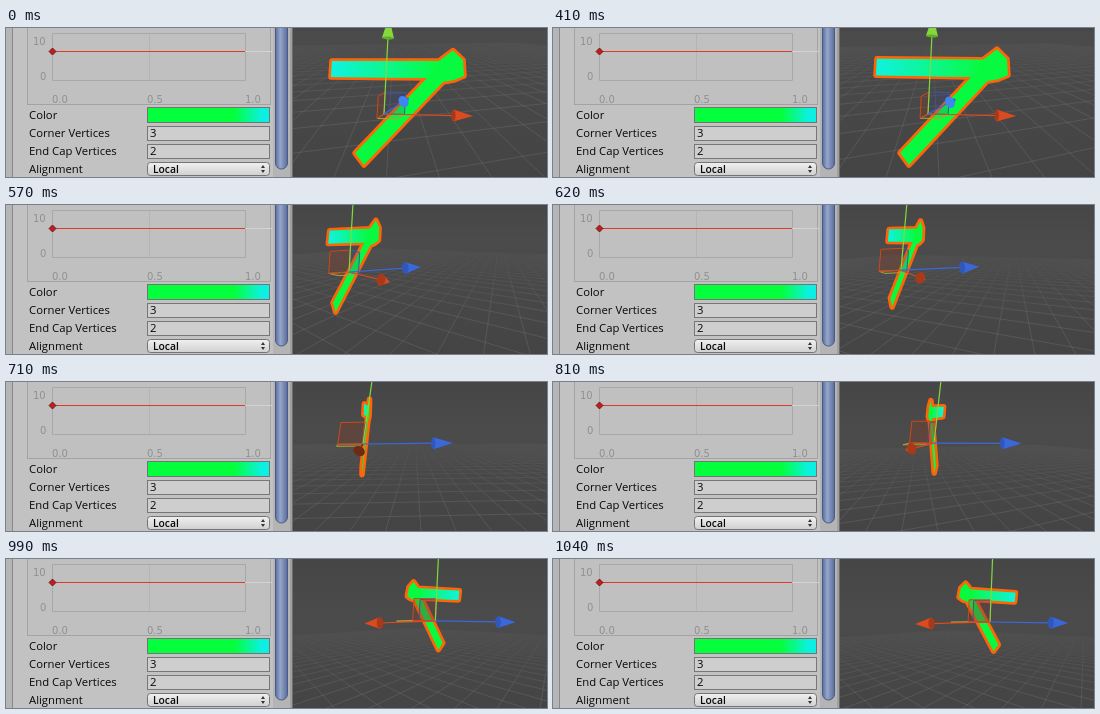
Write an HTML page with a canvas that moves like this. It is 541 px wide and 149 px high and loops after 1110 ms.

```html
<!DOCTYPE html>
<html lang="en">
<head>
<meta charset="utf-8">
<title>Line renderer orbit</title>
<style>
  html, body { margin: 0; width: 100%; height: 100%; overflow: hidden; background: #c2c2c2; }
  svg, canvas { position: absolute; top: 0; display: block; }
  svg { left: 0; }
  canvas { left: 287px; }
  text { font: 11.3px "Open Sans", "DejaVu Sans", sans-serif; fill: #080808; }
  .axis text { font: 10px "DejaVu Sans", sans-serif; fill: #909090; }
  .field rect { fill: #cecece; stroke: #777; }
</style>
</head>
<body>
<svg width="287" height="149" viewBox="0 0 287 149">
  <defs>
    <linearGradient id="ramp">
      <stop offset=".71" stop-color="#04ff3c"/>
      <stop offset=".94" stop-color="#0cf0e4"/>
    </linearGradient>
    <linearGradient id="thumb">
      <stop offset="0" stop-color="#5a6e9e"/>
      <stop offset=".4" stop-color="#94a6ca"/>
      <stop offset="1" stop-color="#5a6d9a"/>
    </linearGradient>
    <linearGradient id="popup" x2="0" y2="1">
      <stop offset="0" stop-color="#f0f0f0"/>
      <stop offset="1" stop-color="#d0d0d0"/>
    </linearGradient>
  </defs>
  <rect width="287" height="149" fill="#c2c2c2"/>
  <rect width="6" height="149" fill="#b5b5b5"/>
  <path d="M6.5 0V149" stroke="#898989"/>

  <g class="axis">
    <rect x="21.5" y="-4.5" width="243" height="81" fill="#c0c0c0" stroke="#a3a3a3"/>
    <path d="M143.5 5V52" stroke="#b4b4b4"/>
    <path d="M46.5 5.5H239.5V52.5H46.5Z" fill="none" stroke="#a8a8a8"/>
    <path d="M239 23.5H266" stroke="#d2d2d2"/>
    <path d="M46 23.5H239" stroke="#e03a2c"/>
    <path d="M46.5 20L50 23.5L46.5 27L43 23.5Z" fill="#c41c1c" stroke="#5c1414" stroke-width=".8"/>
    <text x="27" y="17">10</text>
    <text x="34" y="52">0</text>
    <text x="46" y="75">0.0</text>
    <text x="141" y="75">0.5</text>
    <text x="239" y="75">1.0</text>
  </g>

  <text x="23" y="91">Color</text>
  <text x="23" y="109">Corner Vertices</text>
  <text x="23" y="127">End Cap Vertices</text>
  <text x="23" y="145">Alignment</text>
  <rect x="141.5" y="79.5" width="122" height="15" fill="url(#ramp)" stroke="#747474"/>
  <g class="field">
    <rect x="141.5" y="98.5" width="122" height="14"/>
    <rect x="141.5" y="116.5" width="122" height="14"/>
    <text x="144" y="109">3</text>
    <text x="144" y="127">2</text>
  </g>
  <rect x="141.5" y="134.5" width="122" height="13" rx="3" fill="url(#popup)" stroke="#747474"/>
  <text x="147" y="145" style="font-size:10.3px;font-weight:600">Local</text>
  <path d="M255 140L257 137L259 140ZM255 142L257 145L259 142Z" fill="#333"/>

  <rect x="267" width="17" height="149" fill="#b4b4b4"/>
  <rect x="269.5" y="-10" width="12" height="151" rx="6" fill="url(#thumb)" stroke="#4a5a84"/>
  <rect x="284" width="3" height="149" fill="#a0a0a0"/>
  <path d="M286.5 0V149" stroke="#6c6c6c"/>
</svg>
<canvas id="scene" width="254" height="149"></canvas>

<script>
const ctx = document.getElementById('scene').getContext('2d');
const LOOP = 1110;
const steps = [0, 410, 440, 475, 510, 540, 570, 620, 665, 710, 790, 850, 910, 940, 990, 1040];

// Screen points: c corner, l bar end, e leg end, o gizmo origin, g/r/b axis tips.
// v holds the horizon height and the camera yaw in degrees.
const poses = [
  { t: 0,    c: [450, 40], l: [323, 42], e: [353, 133], o: [378, 86], g: [383, -11], r: [467, 88], b: [403, 70], v: [4, 10] },
  { t: 410,  c: [447, 39], l: [321, 40], e: [351, 133], o: [375, 86], g: [380, -13], r: [463, 88], b: [403, 71], v: [5, 13] },
  { t: 510,  c: [399, 36], l: [311, 34], e: [327, 117], o: [345, 77], g: [355, -36], r: [417, 84], b: [402, 63], v: [16, 32] },
  { t: 570,  c: [370, 29], l: [322, 33], e: [328, 104], o: [343, 67], g: [349, -36], r: [384, 77], b: [415, 62], v: [34, 62] },
  { t: 710,  c: [363, 29], l: [358, 28], e: [356, 90],  o: [357, 62], g: [371, -36], r: [352, 71], b: [447, 61], v: [50, 92] },
  { t: 910,  c: [397, 31], l: [439, 34], e: [421, 86],  o: [417, 60], g: [423, -36], r: [353, 64], b: [501, 62], v: [57, 132] },
  { t: 1040, c: [410, 34], l: [463, 39], e: [443, 90],  o: [437, 63], g: [441, -36], r: [362, 65], b: [515, 64], v: [62, 142] }
];

// The flat line shape as seen face-on; the first four points bound the bar.
const outline = [[433, 33], [326, 33], [325, 49], [421, 50], [349, 125], [358, 137],
                 [437, 54], [448, 52], [458, 48], [457, 32], [447, 22.5]];

const add = (p, q, k = 1) => [p[0] + q[0] * k, p[1] + q[1] * k];
const sub = (p, q) => add(p, q, -1);
const cross = (p, q) => p[0] * q[1] - p[1] * q[0];

function poseAt(t) {
  let i = 0;
  while (i < poses.length - 2 && poses[i + 1].t <= t) i++;
  const a = poses[i], b = poses[i + 1];
  const k = (t - a.t) / (b.t - a.t);
  const out = {};
  for (const key of 'cleogrbv') out[key] = add(a[key], sub(b[key], a[key]), k);
  return out;
}

function trace(points, close) {
  ctx.beginPath();
  points.forEach(p => ctx.lineTo(p[0], p[1]));
  if (close) ctx.closePath();
}

function strokeLine(points, color, width = 1, close = false) {
  trace(points, close);
  ctx.strokeStyle = color;
  ctx.lineWidth = width;
  ctx.stroke();
}

function drawGround([horizon, yaw]) {
  const sky = ctx.createLinearGradient(0, 0, 0, 149);
  sky.addColorStop(0, '#464646');
  sky.addColorStop(horizon / 149, '#4b4b4b');
  sky.addColorStop(1, '#444');
  ctx.fillStyle = sky;
  ctx.fillRect(287, 0, 254, 149);

  const fade = ctx.createLinearGradient(0, horizon + 6, 0, horizon + 75);
  fade.addColorStop(0, 'rgba(125,125,125,0)');
  fade.addColorStop(1, 'rgba(125,125,125,.3)');
  const cos = Math.cos(yaw * Math.PI / 180), sin = Math.sin(yaw * Math.PI / 180);
  const near = 0.6, lens = 150, height = 2.8;
  const place = (x, z) => [x * cos - z * sin, x * sin + z * cos + 5];
  const project = ([x, z]) => [414 + lens * x / z, horizon + lens * height / z];
  function gridLine(p, q) {
    if (p[1] < near && q[1] < near) return;
    if (p[1] > q[1]) [p, q] = [q, p];
    if (p[1] < near) p = add(p, sub(q, p), (near - p[1]) / (q[1] - p[1]));
    strokeLine([project(p), project(q)], fade);
  }
  for (let i = -30; i <= 30; i++) {
    gridLine(place(i, -30), place(i, 30));
    gridLine(place(-30, i), place(30, i));
  }
}

function drawShape({ c, l, e }) {
  const base = poses[0];
  const u = sub(base.l, base.c), w = sub(base.e, base.c), area = cross(u, w);
  const points = outline.map(p => {
    const d = sub(p, base.c);
    const along = add(c, sub(l, c), cross(d, w) / area);
    return add(along, sub(e, c), cross(u, d) / area);
  });
  ctx.lineJoin = 'round';
  strokeLine(points, '#ff6508', 5.5, true);
  ctx.fillStyle = '#08fa40';
  ctx.fill();
  const ramp = ctx.createLinearGradient(l[0], l[1], c[0], c[1]);
  ramp.addColorStop(0, '#10f2e4');
  ramp.addColorStop(.86, '#08fa40');
  ctx.fillStyle = ramp;
  trace(points.slice(0, 4), true);
  ctx.fill();
}

function drawCone(from, tip, color, shade) {
  const d = sub(tip, from), length = Math.hypot(d[0], d[1]) || 1;
  const size = Math.min(21, length * .22);
  const radius = 6, depth = Math.max(1.5, radius * Math.sqrt(1 - (size / 22) ** 2) * .8);
  strokeLine([from, add(tip, d, -size / length)], color, 1.2);
  ctx.save();
  ctx.translate(tip[0], tip[1]);
  ctx.rotate(Math.atan2(d[1], d[0]));
  ctx.fillStyle = color;
  trace([[0, 0], [-size, -radius], [-size, radius]], true);
  ctx.fill();
  ctx.fillStyle = shade;
  ctx.beginPath();
  ctx.ellipse(-size, 0, depth, radius, 0, 0, Math.PI * 2);
  ctx.fill();
  ctx.restore();
}

function drawPlane(o, p, q, color, fill) {
  strokeLine([o, add(o, p), add(add(o, p), q), add(o, q)], color, 1, true);
  ctx.fillStyle = fill;
  ctx.fill();
}

function drawGizmo({ o, g, r, b }) {
  const up = sub(g, o), red = sub(r, o), blue = sub(b, o);
  const rise = up.map(n => n * 22 / Math.hypot(up[0], up[1]));
  const side = red.map(n => n * .23), back = blue.map(n => n * -.28);
  drawPlane(o, side, back, '#b5a238', 'rgba(130,150,50,.1)');
  drawPlane(o, side, rise, '#3f5aa8', 'rgba(50,70,150,.2)');
  drawPlane(o, back, rise, '#d84a1c', 'rgba(150,50,20,.25)');
  drawCone(o, g, '#84d83c', '#5fae2a');
  const hidden = Math.hypot(red[0], red[1]) < 20;
  drawCone(o, r, hidden ? '#6e2a14' : '#dc4a20', hidden ? '#6e2a14' : '#a83a1a');
  const facing = Math.hypot(blue[0], blue[1]) < 60;
  drawCone(o, b, '#3a68dc', facing ? '#3f86f0' : '#3158b8');
}

function draw(t) {
  const time = steps.filter(s => s <= t).pop();
  const pose = poseAt(time);
  ctx.setTransform(1, 0, 0, 1, -287, 0);
  drawGround(pose.v);
  drawShape(pose);
  drawGizmo(pose);
}

const start = performance.now();
function tick() {
  draw((performance.now() - start) % LOOP);
  requestAnimationFrame(tick);
}
tick();
</script>
</body>
</html>
```
